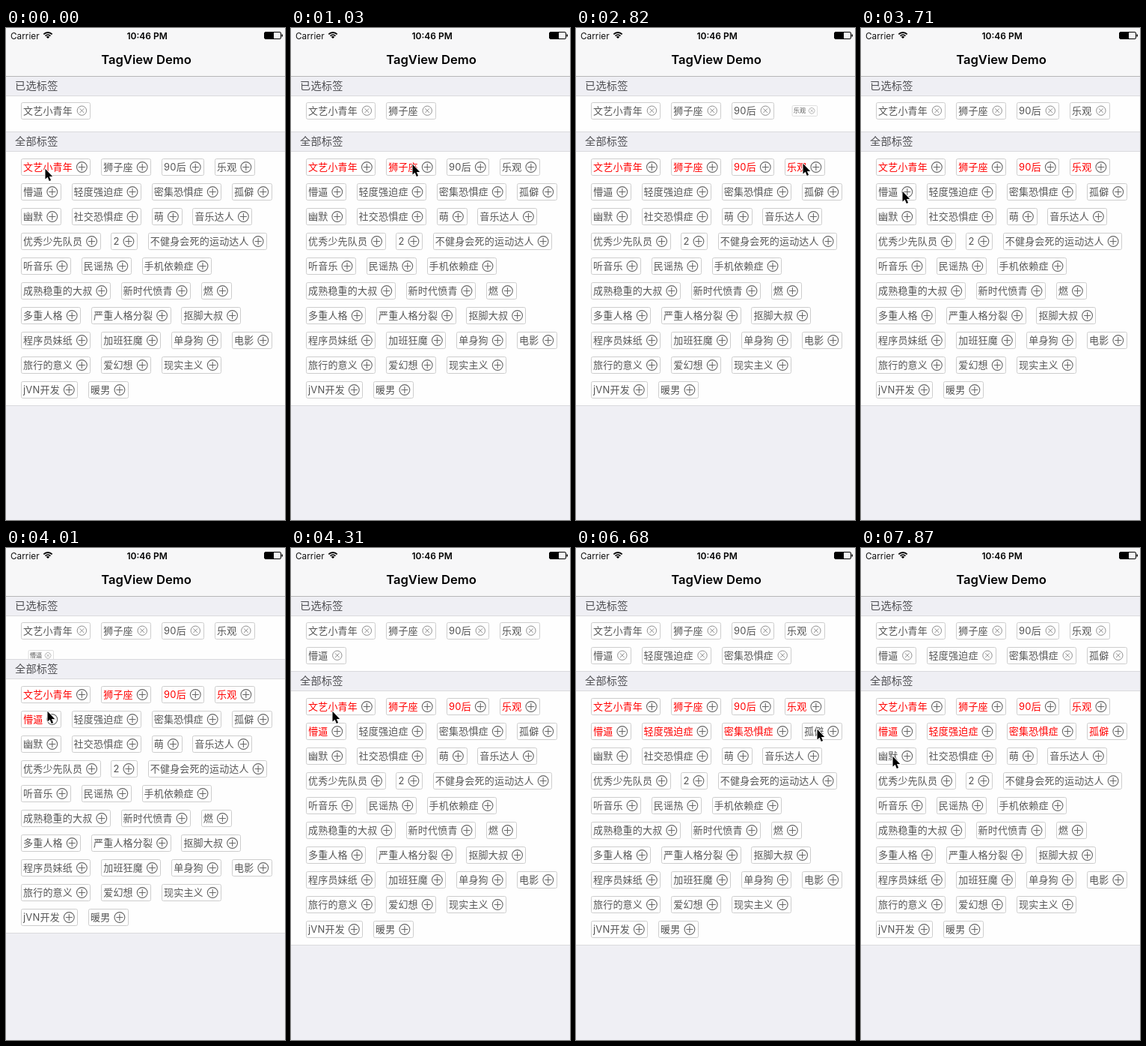
Recreate the animation shown at these times as an HTML page with a canvas. Size 373 by 656 pixels, loop 8 s.

```html
<!DOCTYPE html>
<html lang="zh-CN">
<head>
<meta charset="utf-8">
<title>TagView Demo</title>
<style>
html, body { margin: 0; width: 100%; height: 100%; overflow: hidden; background: #efeff4; }
canvas { display: block; }
</style>
</head>
<body>
<canvas id="stage" width="373" height="656"></canvas>
<script>
const ctx = document.getElementById('stage').getContext('2d');
const LOOP = 8000, TICK = 148.6, WIDTH = 373, HEIGHT = 656;
const FAMILY = 'Inter, "Noto Sans CJK SC", "Noto Sans CJK", sans-serif';
const TAG_FONT = `13px ${FAMILY}`;
const GRAY = '#efeff4', LINE = '#dadadd', WHITE = '#fefefe';
const ROW = 33, TAG_HEIGHT = 22, MARGIN = 20, GAP = 14.8;

const LABELS = ('文艺小青年 狮子座 90后 乐观 懵逼 轻度强迫症 密集恐惧症 孤僻 幽默 社交恐惧症 萌 音乐达人 ' +
  '优秀少先队员 2 不健身会死的运动达人 听音乐 民谣热 手机依赖症 成熟稳重的大叔 新时代愤青 燃 ' +
  '多重人格 严重人格分裂 抠脚大叔 程序员妹纸 加班狂魔 单身狗 电影 旅行的意义 爱幻想 现实主义 jVN开发 暖男').split(' ');

// Times in ticks: tags are picked in order, the pointer travels on after each pick
const picks = [-9, 6, 14, 19, 27, 35, 42, 47];
const expandAt = picks[4];
const stops = [
  { arrive: 0, x: 52, y: 187 },
  { arrive: 3, x: 162, y: 181 },
  { arrive: 10, x: 260, y: 191 },
  { arrive: 17, x: 303, y: 180 },
  { arrive: 25, x: 55, y: 217 },
  { arrive: 31, x: 125, y: 236 },
  { arrive: 40, x: 205, y: 236 },
  { arrive: 45, x: 322, y: 241 },
  { arrive: 53, x: 42, y: 277 }
];

const clamp = v => Math.min(1, Math.max(0, v));
const smooth = v => v * v * (3 - 2 * v);
const easeOut = v => 1 - (1 - v) ** 2.3;

function pointerAt(tick) {
  let { x, y } = stops[0];
  for (const stop of stops.slice(1)) {
    const dx = stop.x - x, dy = stop.y - y;
    const duration = Math.round(1.3 + Math.hypot(dx, dy) / 80);
    const progress = easeOut(clamp(1 + (tick - stop.arrive) / duration));
    x += dx * progress;
    y += dy * progress;
    if (progress < 1) break;
  }
  return [Math.round(x), Math.round(y)];
}

const popScale = elapsed => Math.min(1, .63 + elapsed * .5);
const expansion = elapsed => elapsed < 0 ? 0 : Math.round(26 * smooth(clamp(.42 + elapsed * .5)));

function setFont(font, spacing = 0) {
  ctx.font = font;
  ctx.letterSpacing = `${spacing}px`;
}

function layoutTags() {
  setFont(TAG_FONT, .2);
  let x = MARGIN, row = 0;
  return LABELS.map(label => {
    const width = ctx.measureText(label).width + 26.4;
    if (x + width > 360) { x = MARGIN; row++; }
    const tag = { label, x, width, y: row * ROW };
    x += width + GAP;
    return tag;
  });
}
const tags = layoutTags();

function text(str, x, y, font, color, { align = 'left', spacing = 0 } = {}) {
  setFont(font, spacing);
  ctx.fillStyle = color;
  ctx.textAlign = align;
  ctx.fillText(str, x, y);
}

function rect(x, y, w, h, color) {
  ctx.fillStyle = color;
  ctx.fillRect(x, y, w, h);
}

function strokePath(color, lineWidth, build) {
  ctx.beginPath();
  build();
  ctx.strokeStyle = color;
  ctx.lineWidth = lineWidth;
  ctx.stroke();
}

function drawIcon(x, y, radius, arm, angle, color, lineWidth) {
  ctx.save();
  ctx.translate(x, y);
  ctx.rotate(angle);
  strokePath(color, lineWidth, () => {
    ctx.arc(0, 0, radius, 0, Math.PI * 2);
    ctx.moveTo(-arm, 0); ctx.lineTo(arm, 0);
    ctx.moveTo(0, -arm); ctx.lineTo(0, arm);
  });
  ctx.restore();
}

function drawTag(tag, centerY, color, removable, scale = 1) {
  const half = tag.width / 2;
  ctx.save();
  ctx.translate(tag.x + half, centerY);
  ctx.scale(scale, scale);
  const left = Math.round(tag.x) + .5 - tag.x - half;
  ctx.beginPath();
  ctx.roundRect(left, -TAG_HEIGHT / 2, Math.round(tag.width), TAG_HEIGHT, 2);
  ctx.fillStyle = '#fff';
  ctx.fill();
  ctx.strokeStyle = '#cdcdcd';
  ctx.lineWidth = 1;
  ctx.stroke();
  text(tag.label, 3 - half, 4.7, TAG_FONT, color, { spacing: .2 });
  if (removable) drawIcon(half - 11, -.3, 6.2, 4, Math.PI / 4, '#888', .9);
  else drawIcon(half - 11, 0, 6.9, 4.5, 0, '#666', 1.1);
  ctx.restore();
}

function drawHeader(title, y) {
  rect(0, y, WIDTH, 27, LINE);
  rect(0, y + 1, WIDTH, 25, GRAY);
  text(title, 12, y + 18.3, `14.2px ${FAMILY}`, '#505054', { spacing: .2 });
}

function drawNavBar() {
  rect(0, 0, WIDTH, 64, '#f7f7f8');
  rect(0, 64, WIDTH, 1, '#b6b6b8');
  text('Carrier', 6, 14.7, `11.8px ${FAMILY}`, '#111');
  text('10:46 PM', 188.7, 14.7, `600 12px ${FAMILY}`, '#000', { align: 'center' });
  text('TagView Demo', 187.5, 48.2, `600 16.6px ${FAMILY}`, '#000', { align: 'center' });
  for (const radius of [1.5, 4.8, 8]) {
    strokePath('#000', radius < 2 ? 3 : 1.8, () => ctx.arc(56, 14, radius, -Math.PI * .75, -Math.PI * .25));
  }
  strokePath('#000', 1, () => ctx.roundRect(345.5, 5.5, 22, 9, 1.5));
  rect(346, 6, 12, 8, '#000');
  rect(368.5, 8.5, 1.5, 3, '#000');
}

function drawPointer(x, y) {
  ctx.save();
  ctx.translate(x + .5, y + .8);
  ctx.scale(.95, .95);
  const arrow = new Path2D('M0 0V14.5L3.3 11.5L5.6 17L8 16L5.7 10.7H10.2Z');
  ctx.strokeStyle = '#fff';
  ctx.lineWidth = 1.6;
  ctx.stroke(arrow);
  ctx.fillStyle = '#000';
  ctx.fill(arrow);
  ctx.restore();
}

function draw(tick) {
  const shift = expansion(tick - expandAt);
  const isPicked = i => tick >= picks[i];

  rect(0, 0, WIDTH, HEIGHT, GRAY);
  rect(0, 90, WIDTH, 48 + shift, WHITE);
  tags.forEach((tag, i) => {
    if (isPicked(i)) drawTag(tag, 110.5 + tag.y, '#555', true, popScale(tick - picks[i]));
  });
  rect(0, 165 + shift, WIDTH, 338, WHITE);
  rect(0, 503 + shift, WIDTH, 1, LINE);
  tags.forEach((tag, i) => drawTag(tag, 185.5 + tag.y + shift, isPicked(i) ? '#f00' : '#555', false));

  drawHeader('已选标签', 64);
  drawHeader('全部标签', 138 + shift);
  drawNavBar();
  drawPointer(...pointerAt(tick));
}

// The screen refreshes in coarse ticks; the small lead absorbs rounding of their times
const start = performance.now();
function render() {
  const time = (performance.now() - start) % LOOP;
  draw(Math.floor((time + 12) / TICK));
  requestAnimationFrame(render);
}
render();
</script>
</body>
</html>
```
